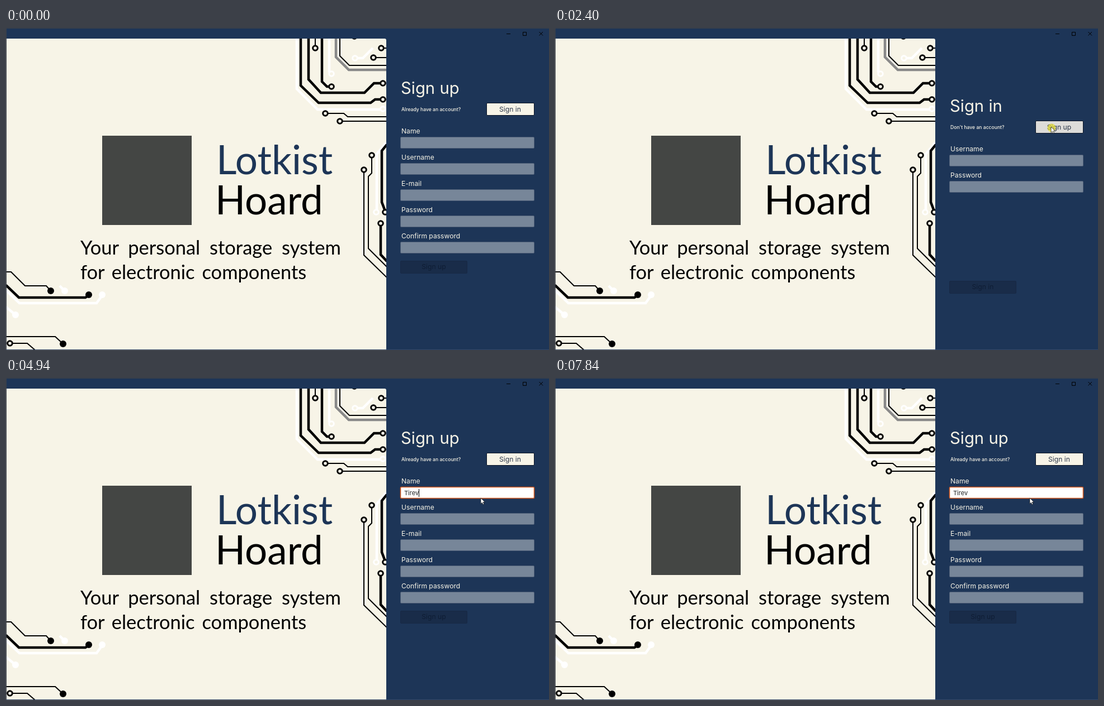
An HTML page for the animation above (8 s loop, 971 by 577 pixels).

```html
<!DOCTYPE html>
<html lang="en">
<head>
<meta charset="utf-8">
<title>Sign up form</title>
<style>
  html, body { margin: 0; width: 100%; height: 100%; overflow: hidden; background: #1d3557; }
  svg { display: block; width: 971px; height: 577px; font-family: Inter, sans-serif; }
  .brand { font-family: Lato, sans-serif; }
  .trace { fill: none; stroke: #000; stroke-width: 2; }
  .thick { stroke-width: 4.5; }
  .white { stroke: #fff; }
  .ring { fill: #f7f4e7; stroke: #000; stroke-width: 3; }
  .white.ring { stroke: #fff; }
  .heading { font-size: 29.3px; fill: #f7f4e7; }
  .small { font-size: 8.6px; font-weight: 500; fill: #f7f4e7; }
  .label { font-size: 12.1px; fill: #f7f4e7; }
  .field { fill: #778699; stroke: #4d5d76; }
  .field.hover { fill: #a5aebc; }
  .field.focus { fill: #fff; stroke: #d2571f; stroke-width: 1.6; }
  .field.error { stroke: #dc1420; }
  .button { fill: #f7f4e7; stroke: #0c1626; }
  .button.hover { fill: #dddcd9; }
  .button-text { font-size: 12.2px; fill: #2f3a4c; text-anchor: middle; }
  .off { fill: #192c49; stroke: #172844; }
  .off-text { font-size: 12.2px; fill: #0f1d34; text-anchor: middle; }
  .typed { font-size: 11px; fill: #222; }
  .message { font-size: 11px; fill: #d01420; }
</style>
</head>
<body>
<svg viewBox="0 0 971 577">
  <defs><clipPath id="cover"><path d="M1 19H677Q680 19 680 22V576H1Z"/></clipPath></defs>
  <rect width="971" height="577" fill="#1d3557"/>
  <g clip-path="url(#cover)">
    <rect y="19" width="680" height="558" fill="#f7f4e7"/>
    <g id="traces"></g>
    <rect x="172" y="193" width="160" height="160" fill="#444644"/>
    <g class="brand">
      <text x="376" y="262" font-size="71" fill="#1d3557">Lotkist</text>
      <text x="374" y="334" font-size="71">Hoard</text>
      <text x="133" y="406" font-size="34.5" word-spacing="8">Your personal storage system</text>
      <text x="133" y="450" font-size="34.5" word-spacing="4">for electronic components</text>
    </g>
  </g>
  <path d="M0 .5H971M.5 0V577" stroke="#3b4049" fill="none"/>
  <path d="M0 576.5H971" stroke="#35496a"/>
  <path d="M895 10.5H902M924.5 7.5H930.5V13.5H924.5ZM953.5 7L960 13.5M960 7L953.5 13.5" fill="none" stroke="#000"/>
  <g id="signup"></g>
  <g id="signin"></g>
  <circle id="glow" r="7.5" fill="#e3dc1e" opacity=".65"/>
  <path id="pointer" d="M0 0V10.4L2.4 8.2L4 11.8L5.8 11L4.2 7.5H7.4Z" fill="#fff" stroke="#111" stroke-width=".7"/>
</svg>
<script>
const $ = id => document.getElementById(id);

function add(parent, tag, attrs, text) {
  const el = document.createElementNS('http://www.w3.org/2000/svg', tag);
  for (const k in attrs) el.setAttribute(k, attrs[k]);
  if (text) el.textContent = text;
  parent.append(el);
  return el;
}

// Circuit board decoration
const traces = $('traces');
const trace = (cls, d) => add(traces, 'path', { class: 'trace ' + cls, d });
const ring = (x, y, cls = '') => add(traces, 'circle', { class: cls + ' ring', cx: x, cy: y, r: 4.3 });
const dot = (x, y, fill = '#000') => add(traces, 'circle', { cx: x, cy: y, r: 6, fill });

trace('thick white', 'M520 19V109L557 146H674M578 19V78L582 82M624 54H638L656 36M663 330V226L680 205');
trace('thick white', 'M0 470L24 493H162L172 479M0 500L17 514M96 462L105 471');
trace('thick', 'M527 19V103L559 134H652L660 128H674M541 19V92L563 116H641L658 99H674M565 19V96L574 105H582');
trace('thick', 'M681 209L672 220V312L678 328M670 350V406L681 418M0 461L23 483H142L148 479');
add(traces, 'path', { d: 'M590 19V52L613 75H680', fill: 'none', stroke: '#888', 'stroke-width': 4.5 });
trace('', 'M553 19V36M597 19V50L614 67H680M671 36H680M657 53H680M571 153H604L611 159H680M597 167H680');
trace('', 'M654 228V260L648 266V395L681 428M640 254V407L681 447');
trace('', 'M0 437H9L34 462H72L80 471M0 553H88L102 566M7 565H38L53 578');
[[624, 54], [582, 82], [674, 145], [662, 330]].forEach(p => ring(...p, 'white'));
[[553, 36], [671, 36], [657, 53], [623, 15], [674, 99], [674, 128], [582, 105], [571, 153], [597, 167],
 [654, 228], [640, 254], [670, 350], [678, 330], [7, 565]].forEach(p => ring(...p));
dot(80, 471); dot(148, 478); dot(102, 566);
dot(105, 471, '#fff'); dot(172, 478, '#fff'); dot(17, 514, '#fff');

// Forms
const zones = { signup: [], signin: [] };

function box(page, parent, cls, x, y, w, h) {
  const el = add(parent, 'rect', { class: cls, x: x + .5, y: y + .5, width: w - 1, height: h - 1, rx: 1.5 });
  if (cls !== 'off') zones[page].push({ el, x, y, w, h });
  return el;
}

function header(page, parent, y, title, hint, action) {
  add(parent, 'text', { class: 'heading', x: 706, y: y + 22 }, title);
  add(parent, 'text', { class: 'small', x: 707, y: y + 53 }, hint);
  box(page, parent, 'button', 859, y + 38, 86, 23);
  add(parent, 'text', { class: 'button-text', x: 901.5, y: y + 54 }, action);
}

function field(page, parent, y, name) {
  add(parent, 'text', { class: 'label', x: 707, y: y - 6 }, name);
  return box(page, parent, 'field', 705, y, 240, 21);
}

function submit(page, parent, y, name) {
  box(page, parent, 'off', 705, y, 120, 23);
  add(parent, 'text', { class: 'off-text', x: 765, y: y + 15 }, name);
}

const upper = add($('signup'), 'g'), lower = add($('signup'), 'g');
header('signup', upper, 96, 'Sign up', 'Already have an account?', 'Sign in');
const nameBox = field('signup', upper, 195, 'Name');
['Username', 'E-mail', 'Password', 'Confirm password']
  .forEach((name, i) => field('signup', lower, 242 + 47 * i, name));
submit('signup', lower, 417, 'Sign up');
const selection = add(upper, 'rect', { x: 712, y: 199, height: 14, fill: '#ca5010' });
const typed = add(upper, 'text', { class: 'typed', x: 712, y: 210 });
const caret = add(upper, 'rect', { y: 199, width: 1, height: 14, fill: '#000' });
const message = add($('signup'), 'text', { class: 'message', x: 705.5, y: 222 });

header('signin', $('signin'), 128, 'Sign in', "Don't have an account?", 'Sign up');
['Username', 'Password'].forEach((name, i) => field('signin', $('signin'), 227 + 47 * i, name));
submit('signin', $('signin'), 453, 'Sign in');

// Timeline
const LOOP = 8000, NAME = 'Tirev', MIN = 5;
const moves = [
  [190, 797, 417], [290, 803, 382], [390, 808, 342], [490, 813, 304], [590, 819, 270], [700, 845, 232],
  [800, 872, 190], [900, 887, 158], [1000, 893, 152], [1100, 897, 149], [1200, 899, 148],
  [1800, 895, 158], [1900, 890, 170], [2000, 887, 177], [2600, 886, 182], [2700, 878, 195],
  [2800, 865, 207], [2910, 852, 213], [3010, 849, 215]
];
const keys = [
  [0, 0], [3940, 1], [4220, 2], [4430, 3], [4520, 4], [4940, 5],
  [5740, 0], [6530, 1], [6840, 2], [7030, 3], [7240, 4], [7340, 5]
];
const clicks = [[1400, 1610], [2400, 2600], [3010, 3110]];
const blinks = [[3510, 3940], [5420, 5740], [6230, 6530], [7840, 8000]];

const within = (t, spans) => spans.some(([a, b]) => t >= a && t < b);
const last = (t, rows) => rows.filter(r => r[0] <= t).pop();
const show = (el, on) => el.setAttribute('visibility', on ? 'visible' : 'hidden');
const place = (el, x, y) => el.setAttribute('transform', `translate(${x} ${y})`);

function render(t) {
  const page = t >= 1610 && t < 2500 ? 'signin' : 'signup';
  const focus = t >= 3010;
  const count = last(t, keys)[1];
  const error = t >= 3940 && count < MIN;
  const shift = error ? 8 : 0;
  const [, x, y] = last(t, moves) || [0, -50, -50];

  for (const id in zones) $(id).style.display = id === page ? '' : 'none';
  for (const z of zones[page])
    z.el.classList.toggle('hover', x >= z.x && x < z.x + z.w && y >= z.y && y < z.y + z.h);
  nameBox.classList.toggle('focus', focus);
  nameBox.classList.toggle('error', error);
  place(upper, 0, -shift);
  place(lower, 0, shift);

  typed.textContent = NAME.slice(0, count);
  message.textContent = !error ? '' : count ? 'Name is too short!' : 'You have to provide Name!';
  if (page === 'signup') {
    const width = count ? typed.getComputedTextLength() : 0;
    const selected = t >= 5540 && t < 5740;
    caret.setAttribute('x', Math.round(712 + width));
    selection.setAttribute('width', selected ? width : 0);
    typed.style.fill = selected ? '#fff' : '';
  }
  caret.style.display = focus && !within(t, blinks) ? '' : 'none';

  place($('pointer'), x, y);
  place($('glow'), x + 1, y + 2);
  show($('glow'), within(t, clicks));
}

const start = performance.now();
function tick() {
  render((performance.now() - start) % LOOP);
  requestAnimationFrame(tick);
}
tick();
</script>
</body>
</html>
```
